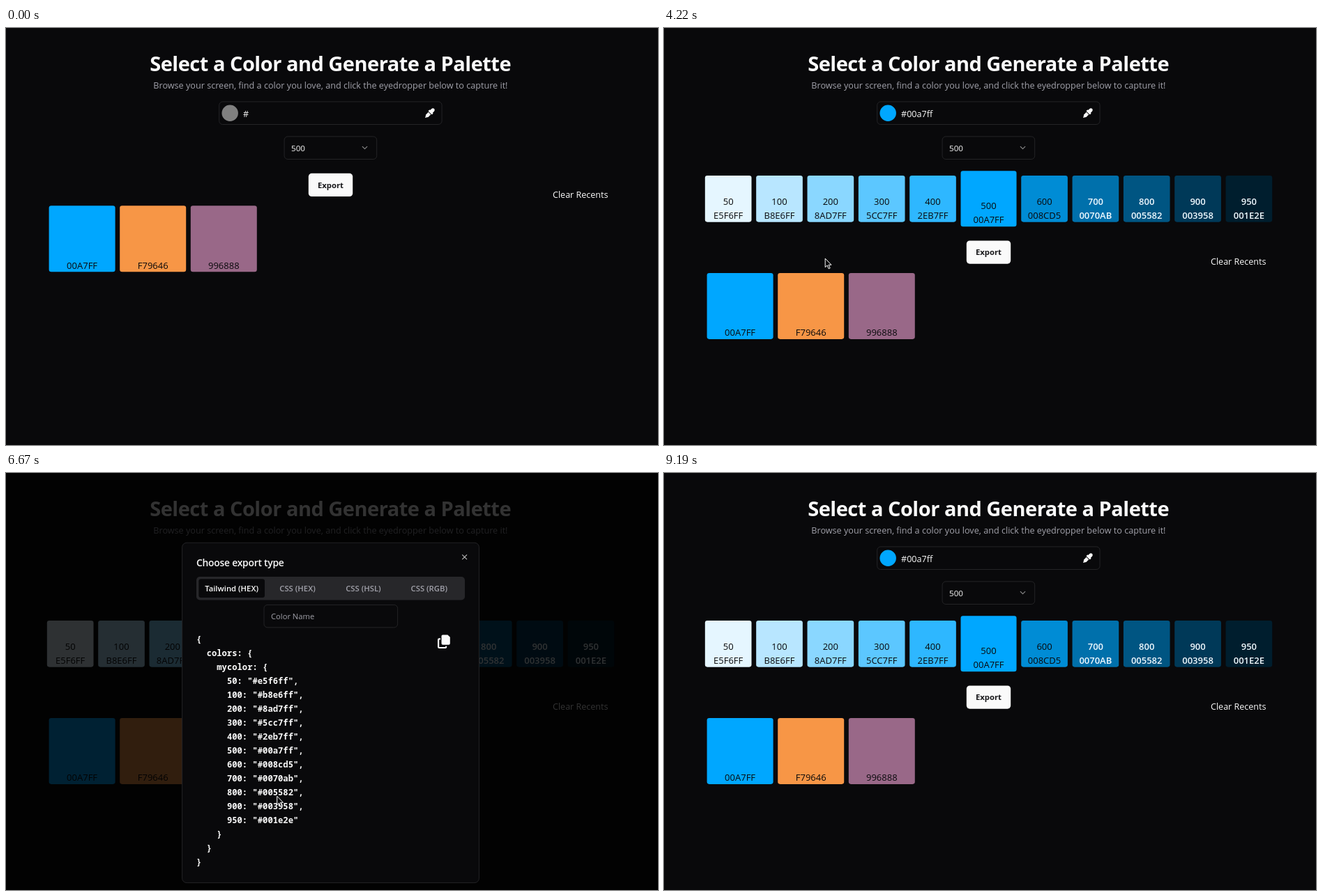
Animation of 935x599 px, one loop 9.67 s. Source, as an HTML page:

```html
<!DOCTYPE html>
<html lang="en">
<head>
<meta charset="utf-8">
<title>Palette generator</title>
<style>
  html, body { margin: 0; width: 100%; height: 100%; overflow: hidden; background: #09090b; }
  svg { display: block; width: 100%; height: 100%; font-family: "Open Sans", "Noto Sans", sans-serif; }
  text { white-space: pre; }
  .mono { font: 600 12.2px "Noto Sans Mono", "DejaVu Sans Mono", monospace; }
</style>
</head>
<body>
<svg id="stage" viewBox="0 0 935 599"></svg>
<script>
const LOOP = 9670, TICK = 78.5;
const OPEN = 5605, CLOSE = 8678, FADE = 200;
const BG = '#09090b', LINE = '#27272a', MUTED = '#a1a1aa', WHITE = '#fafafa';
const shades = [50, 100, 200, 300, 400, 500, 600, 700, 800, 900, 950];
const hexes = ['e5f6ff', 'b8e6ff', '8ad7ff', '5cc7ff', '2eb7ff', '00a7ff',
  '008cd5', '0070ab', '005582', '003958', '001e2e'];
const recents = ['00A7FF', 'F79646', '996888'];

const stage = document.getElementById('stage');

function add(parent, tag, attrs) {
  const el = document.createElementNS('http://www.w3.org/2000/svg', tag);
  for (const k in attrs) el.setAttribute(k, attrs[k]);
  return parent.appendChild(el);
}
const group = (parent, attrs = {}) => add(parent, 'g', attrs);
const box = (parent, x, y, width, height, rx, fill, stroke = 'none') =>
  add(parent, 'rect', { x, y, width, height, rx, fill, stroke, 'stroke-width': 0.9 });
const path = (parent, d, attrs) => add(parent, 'path', { d, fill: 'none', ...attrs });
function label(parent, str, x, y, size, fill, attrs = {}) {
  const el = add(parent, 'text', { x, y, 'font-size': size, fill, ...attrs });
  el.textContent = str;
  return el;
}
const mid = (weight = 400) => ({ 'text-anchor': 'middle', 'font-weight': weight });

// Page header
box(stage, 0, 0, 935, 599, 0, BG);
label(stage, 'Select a Color and Generate a Palette', 465.2, 61.5, 29, WHITE,
  { ...mid(700), 'letter-spacing': -0.5 });
label(stage, 'Browse your screen, find a color you love, and click the eyedropper below to capture it!',
  465.4, 87.3, 12.64, MUTED, mid());

// Colour field
box(stage, 305.7, 105.9, 319.4, 32.6, 5, BG, LINE);
const dot = add(stage, 'circle', { cx: 321.2, cy: 122.3, r: 11.7 });
const value = label(stage, '', 340, 127.6, 12.6, WHITE);
const dropper = group(stage, { transform: 'translate(601 115.3) scale(.0268)', fill: WHITE });
path(dropper, 'M51 333C39 345 32 361 32 379V424L0 480l32 32 56-32h45c17 0 33-7 45-19L305 335 177 207Z', { fill: WHITE });
path(dropper, 'M484 28c-38-37-98-37-136 0l-77 77-13-13c-9-9-25-9-34 0l-41 41c-9 9-9 25 0 34l162 162' +
  'c9 9 25 9 34 0l41-41c9-9 9-25 0-34l-13-13 77-77c37-38 37-98 0-136Z', { fill: WHITE });

// Shade select
box(stage, 399.1, 155.9, 132.6, 32.6, 5, BG, LINE);
label(stage, '500', 409, 176.6, 11.67, WHITE);
path(stage, 'M511.2 170.4l3.3 3.3 3.3-3.3', { stroke: WHITE, 'stroke-opacity': 0.55, 'stroke-width': 1.1,
  'stroke-linecap': 'round', 'stroke-linejoin': 'round' });

// Palette row
const palette = group(stage);
let left = 58.83;
shades.forEach((shade, i) => {
  const big = shade === 500, size = big ? 80 : 66.67, cx = left + size / 2;
  const drop = big ? 6.67 : 0, light = shade > 600;
  box(palette, left, 212 - drop, size, size, 3.3, '#' + hexes[i]);
  const fill = light ? '#f2faff' : BG, style = mid(light ? 600 : 400);
  label(palette, shade, cx, 253.7 + drop, 13, fill, style);
  label(palette, hexes[i].toUpperCase(), cx, 273.5 + drop, 13, fill, style);
  left += size + 6.67;
});

// Export button and recent colours
const lower = group(stage);
const button = box(lower, 433.8, 208.8, 63.4, 33.3, 4.6, WHITE);
label(lower, 'Export', 465.5, 229.5, 11.3, '#18181b', mid(700));
label(lower, 'Clear Recents', 784, 243.7, 12.55, WHITE);
recents.forEach((hex, i) => {
  const x = 61.6 + 101.6 * i;
  box(lower, x, 255.3, 95, 95, 3.3, '#' + hex);
  label(lower, hex, x + 47.5, 345.5, 13, BG, mid());
});

// Export dialog
const shade = box(stage, 0, 0, 935, 599, 0, '#000');
const dialog = group(stage);
box(dialog, 252.6, 100.2, 425.8, 488.4, 6.5, BG, LINE);
label(dialog, 'Choose export type', 273, 133.7, 13.9, WHITE, { 'font-weight': 600, 'letter-spacing': -0.25 });
path(dialog, 'M654.2 117.4l6.8 6.8m0-6.8l-6.8 6.8', { stroke: WHITE, 'stroke-opacity': 0.75, 'stroke-width': 1.1 });
box(dialog, 273, 149.1, 385, 33.3, 5, LINE);
box(dialog, 276.4, 152.3, 94.6, 26.8, 3.3, BG);
['Tailwind (HEX)', 'CSS (HEX)', 'CSS (HSL)', 'CSS (RGB)'].forEach((name, i) =>
  label(dialog, name, 323.6 + 94.4 * i, 169.9, 11.3, i ? MUTED : WHITE, mid(600)));
box(dialog, 370, 189.4, 191.6, 32.5, 5, BG, LINE);
label(dialog, 'Color Name', 380, 210.4, 11.2, MUTED);
path(dialog, 'M623 238.4h-1.7a1.2 1.2 0 0 0-1.2 1.2v10.2a1.2 1.2 0 0 0 1.2 1.2h8.6a1.2 1.2 0 0 0 1.2-1.2v-1',
  { stroke: WHITE, 'stroke-width': 2.2 });
path(dialog, 'M626.4 232.4h7l3.4 3.4v9a1.9 1.9 0 0 1-1.9 1.9h-8.5a1.9 1.9 0 0 1-1.9-1.9v-10.5a1.9 1.9 0 0 1 1.9-1.9Z',
  { fill: WHITE });
const code = ['{', '  colors: {', '    mycolor: {',
  ...shades.map((s, i) => `      ${s}: "#${hexes[i]}"${s < 950 ? ',' : ''}`),
  '    }', '  }', '}'];
code.forEach((line, i) => {
  const body = line.trimStart();
  label(dialog, body, 273 + 7.32 * (line.length - body.length), 243.2 + 19.97 * i, 12.2, WHITE, { class: 'mono' });
});

// Pointer
const ring = add(stage, 'circle', { r: 10, fill: '#ffff00', 'fill-opacity': 0.48 });
const arrow = path(stage, 'M.4.6V13.2L3.3 10.5 5.4 15.4 7.4 14.5 5.3 9.8H9.2Z',
  { fill: BG, stroke: '#fff', 'stroke-width': 1 });
const hand = path(stage, 'M-1.4 1.4a1.4 1.4 0 0 1 2.8 0V6.2L3.8 6.6 6.4 7.3C7.6 7.7 8.2 8.4 8.2 9.6L7.4 14V17.4H-.6V15.4' +
  'L-4.4 10.6C-5 9.4-3.6 8.4-2.6 9.4L-1.4 10.6ZM1.5 6.4V9M4 6.8V9.2M6.4 7.4V9.6',
  { fill: '#fff', stroke: '#111', 'stroke-width': 0.9 });

const clamp = v => Math.min(1, Math.max(0, v));
const smooth = u => u * u * (3 - 2 * u);

// CSS "ease": cubic-bezier(.25, .1, .25, 1)
function ease(x) {
  const bez = (a, b, s) => 3 * a * s * (1 - s) ** 2 + 3 * b * s * s * (1 - s) + s ** 3;
  let lo = 0, hi = 1;
  for (let i = 0; i < 24; i++) {
    const s = (lo + hi) / 2;
    if (bez(0.25, 0.25, s) < x) lo = s; else hi = s;
  }
  return bez(0.1, 1, lo);
}

const moves = [
  { from: 1240, to: 1884, curve: smooth, pts: [[108, 602], [95, 450], [95, 370], [100, 334]] },
  { from: 3930, to: 4945, curve: smooth, pts: [[100, 334], [250, 330], [430, 327], [504, 321], [484, 316]] },
  { from: 5800, to: 7940, curve: u => u,
    pts: [[484, 316], [400, 385], [364, 440], [450, 476], [640, 400], [745, 371], [800, 372]] },
  { from: 8860, to: 9185, curve: u => u * u, pts: [[800, 372], [796, 470], [786, 610]] },
];

// Catmull-Rom through the points of a move
function along(pts, u) {
  const n = pts.length - 1, i = Math.min(n - 1, Math.floor(u * n)), f = u * n - i;
  const at = k => pts[Math.min(n, Math.max(0, k))];
  return [0, 1].map(c => {
    const [a, b, d, e] = [at(i - 1)[c], at(i)[c], at(i + 1)[c], at(i + 2)[c]];
    return b + 0.5 * f * (d - a + f * (2 * a - 5 * b + 4 * d - e + f * (3 * (b - d) + e - a)));
  });
}

function pointer(t) {
  const m = moves.filter(m => t >= m.from).pop() || moves[0];
  return along(m.pts, m.curve(clamp((t - m.from) / (m.to - m.from))));
}

const show = (el, on) => el.setAttribute('display', on ? 'inline' : 'none');
const inside = (x, y, l, t, r, b) => x > l && x < r && y > t && y < b;

function draw(time) {
  const t = Math.floor((time + 25) / TICK) * TICK;
  const picked = t > 2490;
  show(palette, picked);
  lower.setAttribute('transform', `translate(0 ${picked ? 96.6 : 0})`);
  dot.setAttribute('fill', picked ? '#00a7ff' : '#808080');
  value.textContent = picked ? '#00a7ff' : '#';

  const hover = t < OPEN ? clamp((t - 4870) / 150) : 0;
  const tone = Math.round(250 - 24 * hover);
  button.setAttribute('fill', `rgb(${tone},${tone},${tone})`);

  const k = t < CLOSE ? ease(clamp((t - OPEN) / FADE)) : 1 - ease(clamp((t - CLOSE) / FADE));
  const s = 0.95 + 0.05 * k;
  show(shade, k > 0.001);
  show(dialog, k > 0.001);
  shade.setAttribute('opacity', 0.8 * k);
  dialog.setAttribute('opacity', k);
  dialog.setAttribute('transform',
    `translate(465.5 ${344.4 + 9.8 * (1 - k)}) scale(${s}) translate(-465.5 -344.4)`);

  const [x, y] = pointer(t);
  const link = picked
    ? t < OPEN && inside(x, y, 434, 305, 497, 339)
    : inside(x, y, 61, 255, 361, 350);
  show(hand, link);
  show(arrow, !link);
  show(ring, [2433, 5573, 8713].some(c => Math.abs(t - c) < 30));
  for (const el of [ring, arrow, hand]) el.setAttribute('transform', `translate(${x} ${y})`);
}

const start = performance.now();
function tick() {
  draw((performance.now() - start) % LOOP);
  requestAnimationFrame(tick);
}
draw(0);
requestAnimationFrame(tick);
</script>
</body>
</html>
```
